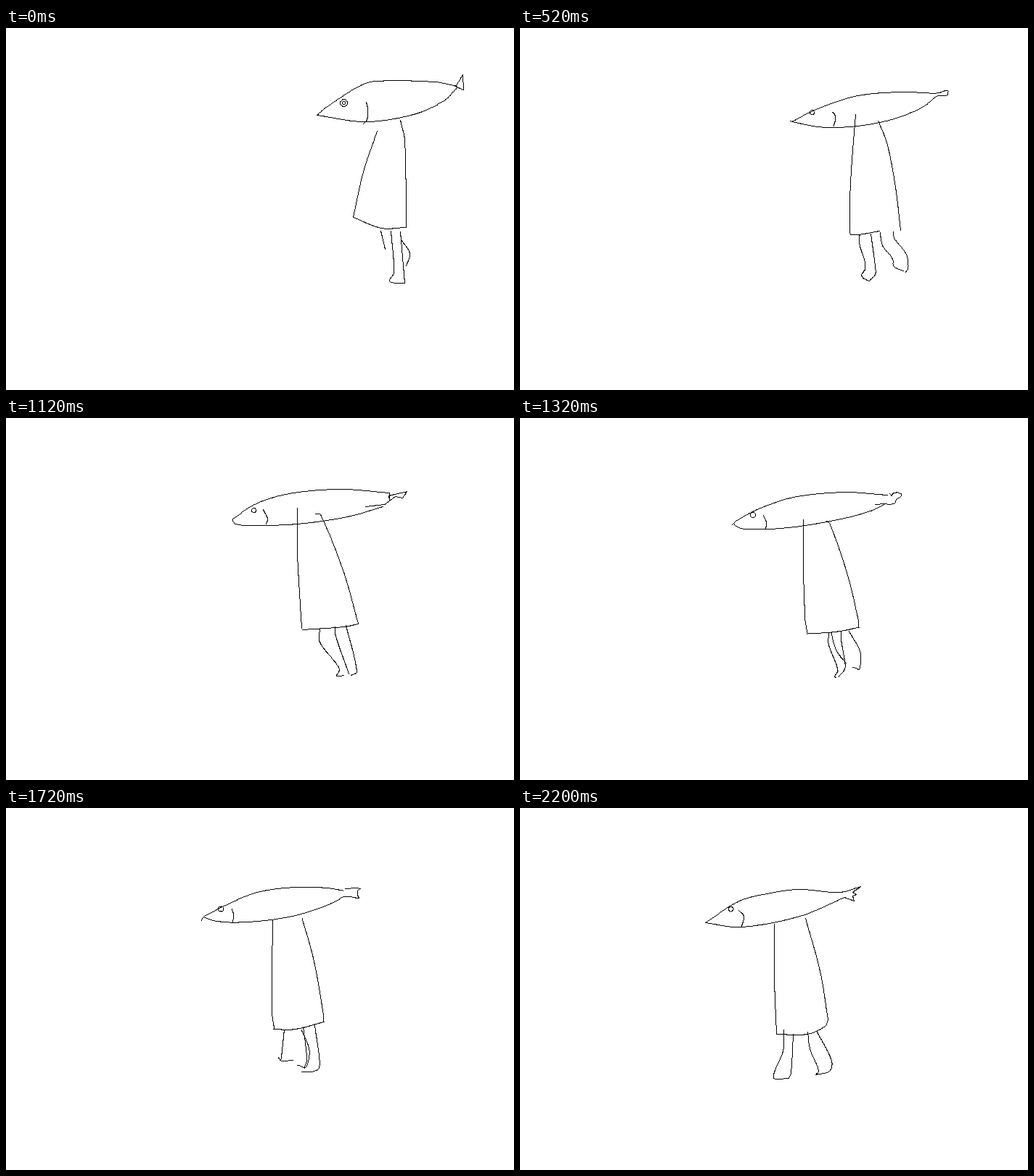
These frames come from a looping animation (700 by 500 pixels, 2280 ms). An HTML page with a canvas:

```html
<!DOCTYPE html>
<html lang="en">
<head>
<meta charset="utf-8">
<title>Walking fish</title>
<style>
html, body { margin: 0; height: 100%; overflow: hidden; background: #fff; }
canvas { display: block; }
</style>
</head>
<body>
<canvas id="stage" width="700" height="500"></canvas>
<script>
// Key poses: a few points per stroke; "at" is the picture in which a pose is reached.
// The eye is centre x, y and radius.
const poses = [{
  at: 0, eye: [465, 103, 5],
  top: '428,120 441,109 486,80 509,73 590,74 621,80',
  belly: '428,120 495,129 561,119 603,100 621,82',
  tail: '616,79 620,79 629,64 630,85 618,80',
  gill: '496,102 498,112 497,126 492,132',
  front: '511,142 492,198 478,261',
  back: '543,127 549,155 551,275',
  hem: '478,261 517,276 550,275',
  a1: '530,280 534,337 528,348 530,351 549,352',
  a2: '543,281 549,352',
  b1: '516,280 522,305',
  b2: '545,293 556,311 551,328'
}, {
  at: 3, eye: [421, 108, 3],
  top: '390,123 420,104 476,87 550,82 573,83',
  belly: '390,123 465,130 525,121 589,90',
  tail: '577,84 581,85 601,78 602,88 594,87 589,90',
  gill: '454,111 457,110 460,118 459,128',
  front: '485,122 478,180 469,278',
  back: '523,128 531,165 539,276',
  hem: '469,279 496,279',
  a1: '510,282 526,318 526,332 517,344 522,348 539,343',
  a2: '528,281 540,325 545,347',
  b1: '478,281 475,294 484,318 476,343 480,349',
  b2: '492,282 499,333 498,345 480,349'
}, {
  at: 7, eye: [383, 124, 3],
  top: '353,133 357,136 405,116 450,100 500,94 555,96',
  belly: '357,135 400,145 485,134 540,117 557,98',
  tail: '553,95 567,96 574,92 578,95 577,99 557,98',
  gill: '405,121 409,130 404,142',
  front: '439,116 435,230 440,290',
  back: '463,127 480,157 499,222 509,282',
  hem: '440,290 455,291 494,281',
  a1: '481,282 480,300 510,310 517,327',
  a2: '500,281 500,290 525,305 526,324 517,327',
  b1: '457,290 467,340 461,349 482,349',
  b2: '474,286 482,348'
}, {
  at: 11, eye: [341, 127, 3],
  top: '312,139 344,118 390,104 460,98 528,103',
  belly: '312,139 314,145 330,148 400,146 470,136 519,122',
  tail: '528,103 528,113 527,107 552,101 546,110 536,108 521,119 495,122',
  gill: '354,126 360,139 358,146',
  front: '401,124 401,185 403,225 407,290',
  back: '426,132 433,133 465,213 485,284',
  hem: '408,292 465,288 485,284',
  a1: '432,290 432,309 459,346 455,356 465,355',
  a2: '453,288 454,301 472,353',
  b1: '453,288 454,301 472,353',
  b2: '468,286 483,350 475,355'
}, {
  at: 15, eye: [300, 140, 4],
  top: '272,154 277,149 325,127 360,114 430,106 483,109',
  belly: '275,150 292,158 345,156 420,141 470,126 482,116',
  tail: '489,104 504,99 497,106 501,108 497,110 504,121 492,116 482,116',
  gill: '315,141 318,148 318,158',
  front: '379,155 379,285 384,303',
  back: '418,151 437,218 449,283 448,293',
  hem: '382,303 415,301 448,293',
  a1: '418,302 416,350 405,361',
  a2: '430,300 432,352 427,359 405,361',
  b1: '405,304 411,320 425,323',
  b2: '437,301 460,327 454,351 440,332'
}, {
  at: 19, eye: [291, 138, 3.5],
  top: '265,155 268,150 320,122 365,112 425,113 445,118',
  belly: '268,150 310,157 385,153 447,127',
  tail: '445,118 462,121 466,116 475,113 466,122 469,129 447,127',
  gill: '306,137 308,145 306,156',
  front: '355,154 353,265 355,307',
  back: '397,153 411,203 426,296',
  hem: '353,307 382,309 427,297',
  a1: '400,301 416,356',
  a2: '420,300 432,360 423,367 408,367',
  b1: '361,308 345,373 335,367 341,376 365,372',
  b2: '376,310 372,369 362,377'
}, {
  at: 22, eye: [290, 139, 3.5],
  top: '255,158 302,128 345,117 385,112 440,116 469,108',
  belly: '255,158 304,164 385,149 447,123',
  tail: '469,108 458,116 463,119 458,121 460,128 447,123',
  gill: '301,141 308,149 305,163',
  front: '350,160 350,235 353,312',
  back: '393,152 413,225 424,292',
  hem: '353,312 395,312 420,301 424,292',
  a1: '396,309 399,332 411,362 407,368',
  a2: '409,309 429,349 426,363 407,368',
  b1: '363,306 362,335 349,372 370,373',
  b2: '376,312 373,365 370,373'
}];
const parts = Object.keys(poses[0]).filter(k => k !== 'at' && k !== 'eye');
const ctx = document.getElementById('stage').getContext('2d');
const mix = (p, q, k) => p.map((v, i) => v + (q[i] - v) * k);

// Evenly spaced points along a smooth curve (or a polyline) through the key points
function trace(text, smooth, count = 64) {
  const pts = text.split(' ').map(p => p.split(',').map(Number));
  const last = pts.length - 1;
  const pos = [0];
  for (let i = 1; i <= last; i++)
    pos.push(pos[i - 1] + Math.hypot(pts[i][0] - pts[i - 1][0], pts[i][1] - pts[i - 1][1]));
  const slope = (i, axis) => {
    const a = Math.max(i - 1, 0), b = Math.min(i + 1, last);
    return (pts[b][axis] - pts[a][axis]) / (pos[b] - pos[a]);
  };
  let s = 1;
  return Array.from({ length: count + 1 }, (_, i) => {
    const d = pos[last] * i / count;
    while (s < last && pos[s] < d) s++;
    const span = pos[s] - pos[s - 1];
    const u = (d - pos[s - 1]) / span, v = 1 - u;
    const p = pts[s - 1], q = pts[s];
    if (!smooth) return mix(p, q, u);
    return [0, 1].map(n =>
      v * v * (1 + 2 * u) * p[n] + u * u * (3 - 2 * u) * q[n] +
      span * u * v * (v * slope(s - 1, n) - u * slope(s, n)));
  });
}

// Hard-edged pixel line, without antialiasing
function stroke(pts) {
  for (let i = 1; i < pts.length; i++) {
    const [p, q] = [pts[i - 1], pts[i]];
    const n = Math.ceil(Math.max(Math.abs(q[0] - p[0]), Math.abs(q[1] - p[1]))) || 1;
    for (let j = 0; j <= n; j++) {
      const [x, y] = mix(p, q, j / n);
      ctx.fillRect(Math.round(x), Math.round(y), 1, 1);
    }
  }
}

function ring(x, y, r) {
  stroke(Array.from({ length: 13 }, (_, i) =>
    [x + r * Math.cos(i * Math.PI / 6), y + r * Math.sin(i * Math.PI / 6)]));
}

function draw(step) {
  ctx.clearRect(0, 0, 700, 500);
  const next = Math.max(1, poses.findIndex(p => p.at >= step));
  const from = poses[next - 1], to = poses[next];
  const k = (step - from.at) / (to.at - from.at);
  for (const part of parts) {
    const smooth = part !== 'tail';
    const end = trace(to[part], smooth);
    stroke(trace(from[part], smooth).map((p, i) => mix(p, end[i], k)));
  }
  const [x, y, r] = mix(from.eye, to.eye, k);
  ring(x, y, r);
  if (r > 4) ring(x, y, r / 2.5);
}

// Pictures alternate between 120 ms and 80 ms
let shown = -1;
function tick() {
  const t = performance.now() % 2280;
  const step = 2 * Math.floor(t / 200) + (t % 200 >= 120 ? 1 : 0);
  if (step !== shown) draw(shown = step);
  requestAnimationFrame(tick);
}
tick();
</script>
</body>
</html>
```
